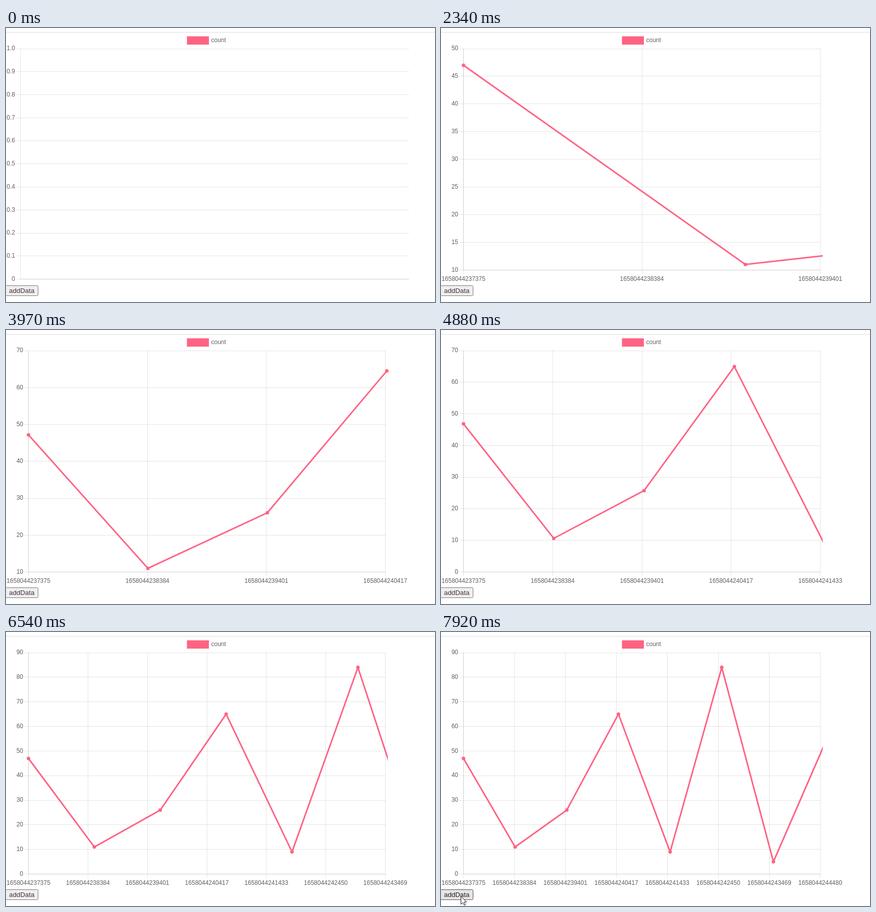
An HTML page with a canvas that plays this animation: 850x544 px, repeating every 7990 ms.

```html
<!DOCTYPE html>
<html lang="en">
<head>
<meta charset="utf-8">
<title>Live line chart</title>
<style>
  html, body { margin: 0; width: 100%; height: 100%; overflow: hidden; background: #fff; }
  canvas { display: block; width: 850px; height: 544px; }
</style>
</head>
<body>
<canvas id="stage" width="850" height="544"></canvas>
<script>
const ctx = document.getElementById('stage').getContext('2d');
const LOOP = 7990, FIRST = 118, INTERVAL = 1046, DURATION = 1030, STALL = 260;
const PINK = 'rgb(255,99,132)', GRID = 'rgba(0,0,0,0.1)', TEXT = '#606060';
const FONT = '"Liberation Sans", Arial, sans-serif';
const TOP = 41, OVERFLOW = 5, MAX_TICKS = 10;

const values = [47, 11, 26, 65, 9, 84, 5, 58];
const stamps = [7375, 8384, 9401, 10417, 11433, 12450, 13469, 14480].map(ms => 1658044230000 + ms);

const lerp = (a, b, p) => a + (b - a) * p;
const clamp01 = p => Math.min(Math.max(p, 0), 1);
const easeOutQuart = p => 1 - (1 - p) ** 4;
const easeInOut = p => p * p * (3 - 2 * p);
const crisp = v => Math.floor(v) + 0.5;

// round a tick spacing up to 1, 2, 5 or 10 times a power of ten
function niceStep(raw) {
  const power = 10 ** Math.floor(Math.log10(raw));
  return power * [1, 2, 5, 10].find(m => raw / power <= m + 1e-9);
}

function yScale(data) {
  let min = data.length ? Math.min(...data) : 0;
  let max = data.length ? Math.max(...data) : 1;
  if (min === max) { min--; max++; }
  const step = niceStep((max - min) / MAX_TICKS);
  return {
    step,
    min: Math.floor(min / step + 1e-9) * step,
    max: Math.ceil(max / step - 1e-9) * step,
  };
}

// chart layout with the first `count` values
function layout(count) {
  return {
    count,
    ...yScale(values.slice(0, count)),
    left: count ? 44.5 : 28.5,
    right: count > 1 ? 751.5 : 798,
    bottom: count ? 480.5 : 498.5,
  };
}

const xAt = (s, i) => s.left + (s.right - s.left) * i / Math.max(s.count - 1, 1);
const yAt = (s, v) => lerp(s.bottom, TOP, (v - s.min) / (s.max - s.min));

function line(x1, y1, x2, y2, color = GRID) {
  ctx.strokeStyle = color;
  ctx.lineWidth = 1;
  ctx.beginPath();
  ctx.moveTo(x1, y1);
  ctx.lineTo(x2, y2);
  ctx.stroke();
}

function text(str, x, y, align, color = TEXT, size = 12) {
  ctx.font = `${size}px ${FONT}`;
  ctx.textAlign = align;
  ctx.textBaseline = 'middle';
  ctx.fillStyle = color;
  ctx.fillText(str, x, y);
}

function drawAxes(s) {
  const steps = Math.round((s.max - s.min) / s.step);
  for (let k = 0; k <= steps; k++) {
    const v = s.min + k * s.step, y = yAt(s, v);
    line(s.left - 8, crisp(y), s.right + 0.5, crisp(y));
    text(v && s.step < 1 ? v.toFixed(1) : Math.round(v), s.left - 10.5, y, 'right');
  }
  for (let i = 0; i < s.count; i++) {
    const x = xAt(s, i);
    line(crisp(x), TOP, crisp(x), s.bottom + 8);
    text(stamps[i], x, 498.5, 'center');
  }
  line(s.left, TOP, s.left, s.bottom);
  line(s.left, s.bottom, s.right + 0.5, s.bottom);
}

// points glide from the previous layout; the newest rises from the base line
function drawSeries(s, prev, p) {
  const points = values.slice(0, s.count).map((v, i) => {
    const fromX = prev.count ? xAt(prev, i) : s.left;
    const fromY = !prev.count ? s.bottom : i < prev.count ? yAt(prev, v) : prev.bottom;
    return [lerp(fromX, xAt(s, i), p), lerp(fromY, yAt(s, v), p)];
  });

  ctx.save();
  ctx.beginPath();
  ctx.rect(s.left - OVERFLOW, TOP - OVERFLOW, s.right - s.left + 2 * OVERFLOW, s.bottom - TOP + 2 * OVERFLOW);
  ctx.clip();
  ctx.beginPath();
  points.forEach(pt => ctx.lineTo(...pt));
  ctx.strokeStyle = PINK;
  ctx.lineWidth = 3;
  ctx.stroke();
  ctx.restore();

  ctx.fillStyle = PINK;
  for (const [x, y] of points) {
    if (x > s.right + OVERFLOW) continue;
    ctx.beginPath();
    ctx.arc(x, y, 3.5, 0, 2 * Math.PI);
    ctx.fill();
  }
}

function drawButton(hover) {
  ctx.beginPath();
  ctx.roundRect(-1.5, 511.5, 65, 20, 2);
  ctx.fillStyle = hover ? '#e5e5e5' : '#efefef';
  ctx.fill();
  ctx.strokeStyle = hover ? '#4f4f4f' : '#767676';
  ctx.lineWidth = 1;
  ctx.stroke();
  text('addData', 6, 522, 'left', hover ? '#222' : '#46303c', 13.333);
}

function drawPointer(x, y) {
  ctx.save();
  ctx.translate(Math.round(x) + 0.5, Math.round(y) + 0.5);
  ctx.fillStyle = '#fff';
  ctx.strokeStyle = '#111';
  ctx.lineWidth = 1;
  const arrow = new Path2D('M0 0V16L4 12.5 6.5 18 9 17 6.5 11.5H11Z');
  ctx.fill(arrow);
  ctx.stroke(arrow);
  ctx.restore();
}

function draw(t) {
  ctx.fillStyle = '#fff';
  ctx.fillRect(0, 0, 850, 544);
  line(0, 8.5, 850, 8.5, '#ddd');
  ctx.fillStyle = PINK;
  ctx.fillRect(358.5, 16.5, 43.5, 16.5);
  text('count', 406.5, 24.5, 'left');

  const count = Math.max(0, Math.floor((t - FIRST) / INTERVAL) + 1);
  const state = layout(count);
  drawAxes(state);
  if (count) {
    const elapsed = t - FIRST - (count - 1) * INTERVAL;
    // the first point appears partway up and waits there
    const shown = count === 1 ? Math.max(elapsed, STALL) : elapsed;
    drawSeries(state, layout(count - 1), easeOutQuart(clamp01(shown / DURATION)));
  }

  const move = easeInOut(clamp01((t - 7110) / 310));
  const visible = t > 6880;
  drawButton(visible && move > 0.4);
  if (visible) drawPointer(lerp(76, 39, move), lerp(510, 524, move));
}

const begin = performance.now();
function tick() {
  draw((performance.now() - begin) % LOOP);
  requestAnimationFrame(tick);
}
tick();
</script>
</body>
</html>
```
